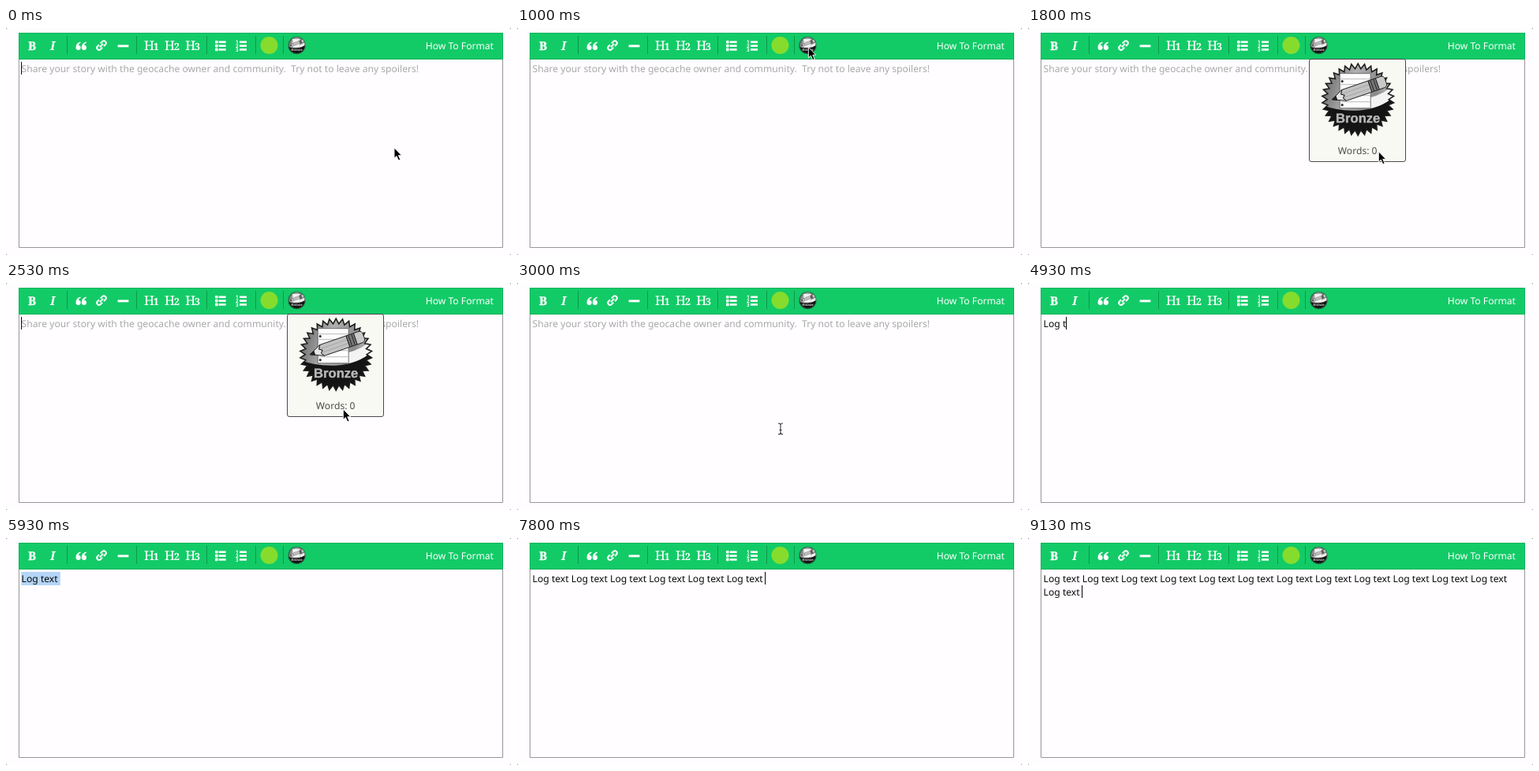
An HTML page for the animation above (9270 ms loop, 640x288 px).

```html
<!DOCTYPE html>
<html lang="en">
<head>
<meta charset="utf-8">
<title>Log editor</title>
<style>
  html, body { margin: 0; width: 100%; height: 100%; overflow: hidden; background: #fffdff; }
  svg { display: block; width: 640px; height: 288px; }
  text { font: 12.13px "Noto Sans", sans-serif; white-space: pre; text-rendering: geometricPrecision; }
  .icons text { font-family: "Noto Serif", serif; fill: #fff; }
  .icons .bold { font-size: 15px; font-weight: 800; stroke: #fff; stroke-width: .3; }
  .icons .italic { font-size: 15.5px; font-style: italic; font-weight: 600; }
  .icons .head { font-size: 16.3px; stroke: #fff; stroke-width: .2; }
  .icons .level { font-size: 12.5px; font-weight: 700; }
  .icons .digit { font: bold 6.3px "Noto Sans", sans-serif; }
  .badge text { font: bold 16.6px "Liberation Sans", Arial, sans-serif; fill: #b9b9b9; stroke: #b9b9b9; stroke-width: .4; }
</style>
</head>
<body>
<svg viewBox="0 0 640 288" xmlns="http://www.w3.org/2000/svg">
  <defs>
    <linearGradient id="metal" x1="0" y1="0.2" x2="1" y2="0.5">
      <stop offset="0" stop-color="#666"/>
      <stop offset=".4" stop-color="#b0b0b0"/>
      <stop offset=".75" stop-color="#8a8a8a"/>
      <stop offset="1" stop-color="#d8d8d8"/>
    </linearGradient>
    <clipPath id="burstClip"><path class="burst"/></clipPath>
    <g id="badge" class="badge">
      <path class="burst" fill="url(#metal)"/>
      <g clip-path="url(#burstClip)">
        <path d="M14 -2Q36 -8 47 -20V4Q34 14 14 14Z" fill="#f3f3f3"/>
        <path d="M-47 6Q-28 15 0 14Q30 12 47 -5V47H-47Z" fill="#141414"/>
      </g>
      <path class="burst" fill="none" stroke="#1d1d1d" stroke-width="1.6"/>
      <path d="M-23 -33H16V11H-23Z" fill="#fdfdfd" stroke="#555" stroke-width=".8"/>
      <path d="M-22 -26H16M-22 -19H16M-22 -12H16M-22 -5H16M-22 3H16" stroke="#a9a9a9" stroke-width=".8"/>
      <g fill="#333"><circle cx="-20" cy="-23" r="1.6"/><circle cx="-20" cy="7" r="1.6"/></g>
      <g transform="translate(-33 0) rotate(-19)" stroke="#222" stroke-width=".9">
        <path d="M0 0L16 -7.5L13 -2.5L17 0L14 3L17 7.5Z" fill="#e6e6e6"/>
        <path d="M0 0L6 -2.8V2.8Z" fill="#222"/>
        <path d="M16 -7.5H51V7.5H17L14 3L17 0L13 -2.5Z" fill="#c2c2c2"/>
        <path d="M15 -2.5H51M16 2.5H51" stroke="#999" stroke-width=".6"/>
        <path d="M51 -7.5H61V7.5H51Z" fill="#777"/>
        <path d="M54 -7V7M58 -7V7"/>
        <path d="M61 -7.5H68Q72 -7 72 -3V3Q72 7 68 7.5H61Z" fill="#c9c9c9"/>
      </g>
      <text y="29" text-anchor="middle">Bronze</text>
    </g>
  </defs>

  <rect width="640" height="288" fill="#8c8c8c"/>
  <rect width="640" height="288" rx="2.5" fill="#fffdff"/>
  <path d="M16.5 39V278.5H629.5V39" fill="#fffdff" stroke="#979797"/>
  <rect x="16.5" y="6.5" width="613" height="33" fill="#12cb67" stroke="#10b35c"/>
  <path d="M77.5 10V33M165.5 10V33M254.5 10V33M316.5 10V33M351.5 10V33" stroke="#0b994c"/>

  <g class="icons" fill="#fff">
    <text class="bold" x="28" y="28">B</text>
    <text class="italic" x="56" y="28">I</text>
    <g id="quotes"></g>
    <g transform="translate(121 22.1) rotate(-45)" fill="none" stroke="#fff" stroke-width="2">
      <path d="M-1.5 -2.7H-4.3A2.7 2.7 0 0 0 -4.3 2.7H-1M1.5 2.7H4.3A2.7 2.7 0 0 0 4.3 -2.7H1M-3 0H3"/>
    </g>
    <rect x="141.6" y="21.4" width="13.8" height="2.9"/>
    <g id="headings"></g>
    <g id="lists"></g>
  </g>
  <circle cx="333.5" cy="22" r="11" fill="#86dc2c"/>
  <use href="#badge" transform="translate(368.5 22) scale(.247)"/>
  <text x="618" y="26.5" text-anchor="end" fill="#fff">How To Format</text>

  <rect id="selection" x="19.3" y="43" width="49.5" height="17" fill="#b4d5f8"/>
  <text id="placeholder" x="19.6" y="55.5" fill="#a9a9a9">Share your story with the geocache owner and community.  Try not to leave any spoilers!</text>
  <text id="line0" x="19.6" y="55.5" fill="#0a0a0a"></text>
  <text id="line1" x="19.6" y="72.5" fill="#0a0a0a"></text>
  <rect id="caret" width="1.1" height="16" fill="#111"/>

  <g id="tooltip">
    <rect x="356.5" y="39.5" width="122" height="130" rx="2.5" fill="#f9f9f3" stroke="#4a4a4a"/>
    <use href="#badge" x="418.2" y="90.7"/>
    <text x="417.7" y="159.5" text-anchor="middle" fill="#4a4a4a">Words: 0</text>
  </g>

  <path id="arrow" d="M0 0V13.3L3 10.5L5.4 16L7.8 15L5.4 9.7H9.4Z" fill="#000" stroke="#fff" stroke-width=".9"/>
  <path id="beam" d="M-3 -7Q0 -7 0 -5Q0 -7 3 -7M0 -5V5M-3 7Q0 7 0 5Q0 7 3 7M-1.5 1.5H1.5" fill="none" stroke="#333" stroke-width="1.1"/>
</svg>

<script>
const LOOP = 9270;
const PHRASE = 'Log text ';
const PER_LINE = 12;
const KEY_TIMES = [4530, 4630, 4730, 4820, 4900, 5030, 5160, 5270, 5400];
const SELECT = [5690, 6390];
const PASTE_START = 6870, PASTE_STEP = 200;
const TOOLTIP = [1060, 2860];
// time, x, y of the mouse
const PATH = [
  [0, 492, 152], [200, 492, 152], [930, 369, 24], [1250, 372, 28], [1760, 444.3, 156.7],
  [2350, 444.3, 156.7], [2700, 412, 163], [2960, 334, 185], [3250, 334, 185],
  [3800, 235, 122], [4250, 110, 53], [LOOP, 110, 53]
];

const el = id => document.getElementById(id);
const show = (id, on) => el(id).style.display = on ? '' : 'none';
const within = (t, [from, to]) => t >= from && t < to;

function drawStatic() {
  const teeth = 34;
  const points = Array.from({ length: teeth * 2 }, (_, i) => {
    const r = i % 2 ? 39 : 45.5, a = Math.PI * i / teeth;
    return (r * Math.sin(a)).toFixed(2) + ' ' + (-r * Math.cos(a)).toFixed(2);
  });
  document.querySelectorAll('.burst').forEach(p => p.setAttribute('d', `M${points.join('L')}Z`));

  el('quotes').innerHTML = [88.5, 95.8].map(x =>
    `<path transform="translate(${x} 17.5)" d="M6 0V1.4Q3.6 2.2 3.3 4.2A3.1 3.1 0 1 1 0 7.2Q0 1.4 6 0Z"/>`).join('');
  el('headings').innerHTML = [1, 2, 3].map(n => {
    const x = 148.7 + 26.2 * n;
    return `<text class="head" x="${x}" y="28">H</text><text class="level" x="${x + 11.8}" y="27.5">${n}</text>`;
  }).join('');
  el('lists').innerHTML = [0, 1, 2].map(i => {
    const y = 16 + 4.8 * i;
    return `<rect x="265" y="${y}" width="3.6" height="3.6" rx=".8"/>
      <rect x="269.6" y="${y + .5}" width="9" height="2.6"/>
      <text class="digit" x="291" y="${y + 4.1}">${i + 1}</text>
      <rect x="296" y="${y + .5}" width="9" height="2.6"/>`;
  }).join('');
}

function textAt(t) {
  if (t < PASTE_START) return PHRASE.slice(0, KEY_TIMES.filter(k => k <= t).length);
  return PHRASE.repeat(2 + Math.floor((t - PASTE_START) / PASTE_STEP));
}

function mouseAt(t) {
  const i = PATH.findIndex(([time]) => time > t);
  const [t0, x0, y0] = PATH[i - 1], [t1, x1, y1] = PATH[i];
  const u = (t - t0) / (t1 - t0), k = u * u * (3 - 2 * u);
  return [x0 + (x1 - x0) * k, y0 + (y1 - y0) * k];
}

function render(t) {
  const text = textAt(t), split = PER_LINE * PHRASE.length;
  const lines = [text.slice(0, split), text.slice(split)];
  lines.forEach((line, i) => el('line' + i).textContent = line);
  show('placeholder', !text);

  const selected = within(t, SELECT);
  show('selection', selected);
  const row = lines[1] ? 1 : 0;
  const width = lines[row] ? el('line' + row).getComputedTextLength() : 0;
  el('caret').setAttribute('x', Math.floor(19.4 + width));
  el('caret').setAttribute('y', 43 + 17 * row);
  show('caret', !selected && (text || t % 1060 < 530));

  const open = within(t, TOOLTIP);
  show('tooltip', open);

  const [x, y] = mouseAt(t), visible = t < KEY_TIMES[0];
  const beam = t > 200 && y > 40 && !open;
  show('beam', visible && beam);
  show('arrow', visible && !beam);
  el(beam ? 'beam' : 'arrow').setAttribute('transform', `translate(${x} ${y})`);
}

drawStatic();
const start = performance.now();
function tick() {
  render((performance.now() - start) % LOOP);
  requestAnimationFrame(tick);
}
tick();
</script>
</body>
</html>
```
